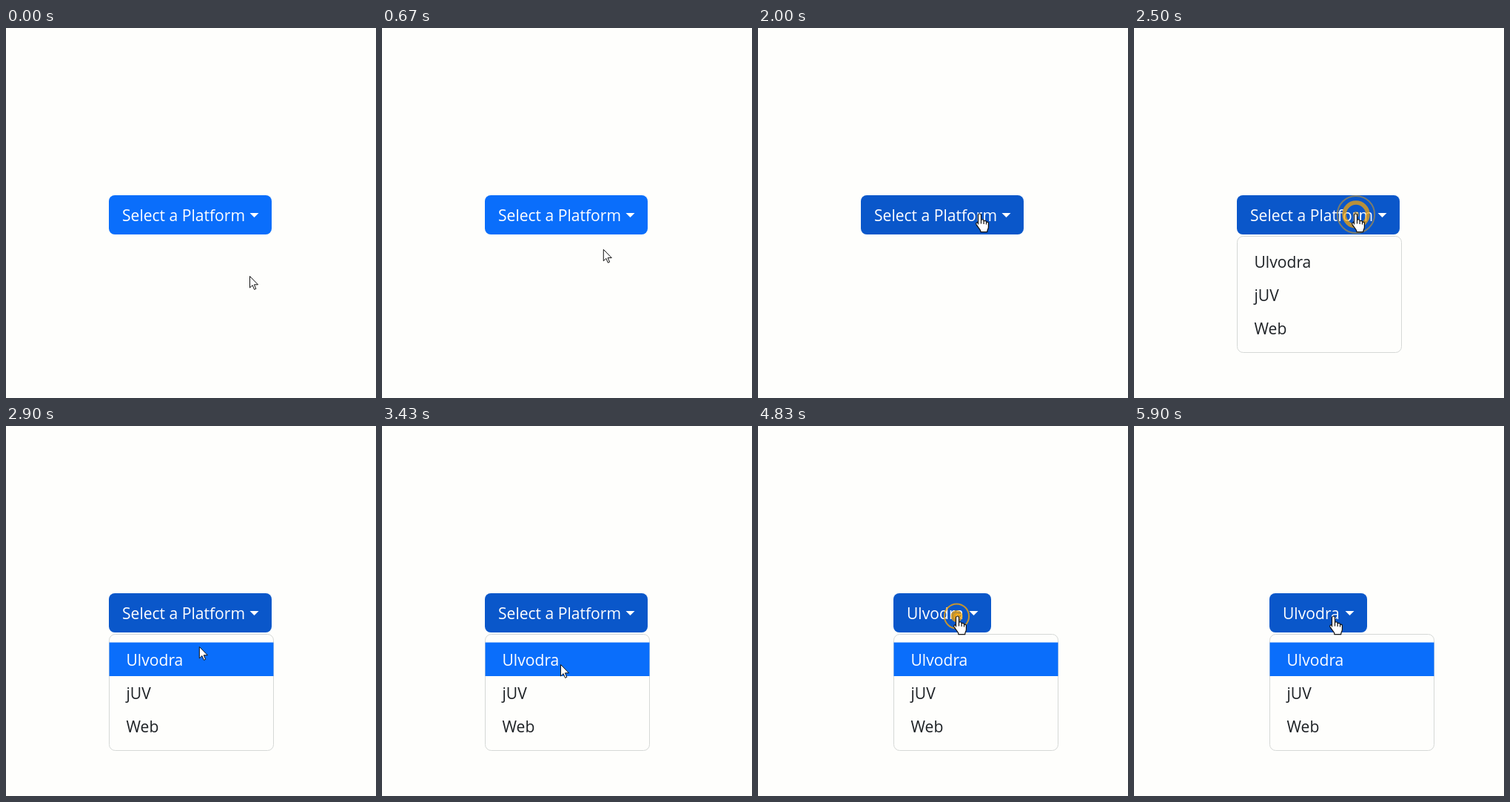
Animation of 500x500 px, one loop 5.96 s. Source, as an HTML page:

```html
<!DOCTYPE html>
<html lang="en">
<head>
<meta charset="utf-8">
<title>Dropdown demo</title>
<style>
  html, body { margin: 0; width: 100%; height: 100%; overflow: hidden; background: #fefefc; }
  svg { display: block; width: 100vw; height: 100vh; }
  text { font: 21.1px "Open Sans", "Noto Sans", sans-serif; fill: #1c2024; }
  .light { fill: #fff; }
</style>
</head>
<body>
<svg viewBox="0 0 500 500">
  <rect width="500" height="500" fill="#fefefc"/>
  <g id="button">
    <rect id="face" y="226" height="53" rx="8"/>
    <text id="label" class="light" x="18" y="261"></text>
    <path id="caret" class="light" d="M0 250h12l-6 6z"/>
  </g>
  <g id="menu">
    <rect x=".5" y="281.5" width="222" height="157" rx="8" fill="#fefefc" stroke="#d5d8d6"/>
    <rect id="highlight" x=".5" y="292.5" width="222" height="45.5" fill="#0a6efb"/>
    <text id="first" x="23.5" y="324">Ulvodra</text>
    <text x="23.5" y="369">jUV</text>
    <text x="23.5" y="414">Web</text>
  </g>
  <g id="ripple" fill="none" stroke="#ffa800">
    <circle id="outer" stroke-width="2"/>
    <circle id="ring" stroke-width="5.5"/>
    <circle id="dot" r="4" fill="#ffa800" stroke="none"/>
  </g>
  <g id="cursor" fill="#fff" stroke="#111" stroke-linejoin="round">
    <path id="arrow" d="M.5.5v15.5l3.6-3.4 2.5 5.8 2.2-1-2.4-5.6h5.1z"/>
    <path id="hand" stroke-width="1.2" d="M-2 14V2a2 2 0 0 1 4 0v7.5c0-2.5 3.6-2.3 3.6.4v.8c.3-2 3.4-1.8 3.4.6v1c.4-1.8 2.9-1.4 2.9.8v5c0 2-1.2 3-1.6 5v1.5h-9v-1.5c-1-2-3.5-5-5.6-8.2c-1.6-2.6 1-3.8 2.3-2.2zM2 9.5v4M5.6 10.5v3.5M9 11.5v3"/>
  </g>
</svg>
<script>
const LOOP = 5960;
const IDLE = [10, 110, 251], HOVER = [11, 96, 210], ACTIVE = [10, 87, 202];
const el = {};
for (const node of document.querySelectorAll('[id]')) el[node.id] = node;

const clamp = v => Math.max(0, Math.min(1, v));
const show = (node, on) => node.setAttribute('display', on ? 'inline' : 'none');
const set = (node, attrs) => {
  for (const name in attrs) node.setAttribute(name, attrs[name]);
};

// Pointer stops: time, x, y
const stops = [
  [0, 329, 335], [20, 329, 335], [600, 301, 302], [1130, 291, 281],
  [1200, 293, 272], [1270, 302, 261], [1930, 302, 261], [2000, 299.5, 251],
  [2700, 299.5, 251], [3030, 241, 322], [3830, 241, 322], [4030, 289, 254],
  [4170, 305, 248], [4400, 305, 248], [4650, 269.5, 257], [LOOP, 269.5, 257]
];

// Speed through a stop; zero where the pointer rests before or after it.
function speed(i, axis) {
  const a = stops[i - 1], b = stops[i], c = stops[i + 1];
  if (!a || !c) return 0;
  const resting = (p, q) => p[1] === q[1] && p[2] === q[2];
  return resting(a, b) || resting(b, c) ? 0 : (c[axis] - a[axis]) / (c[0] - a[0]);
}

function pointerAt(t) {
  const i = stops.findIndex(s => s[0] > t);
  const a = stops[i - 1], b = stops[i];
  const span = b[0] - a[0], u = (t - a[0]) / span, v = 1 - u;
  return [1, 2].map(axis =>
    a[axis] * v * v * (1 + 2 * u) + b[axis] * u * u * (3 - 2 * u) +
    span * u * v * (speed(i - 1, axis) * v - speed(i, axis) * u));
}

// Each click pauses part-way, then finishes at its own rate.
const clicks = [
  { start: 2200, pause: 2500, resume: 2700, rate: 1, x: 300, y: 252 },
  { start: 3430, pause: 3630, resume: 3830, rate: 1, x: 240.5, y: 323 },
  { start: 4700, pause: 4970, resume: 5430, rate: 2.3, x: 268.5, y: 257 }
];

function drawRipple(t) {
  const click = clicks.filter(c => t > c.start).pop();
  const age = click
    ? Math.min(t, click.pause) - click.start + Math.max(0, t - click.resume) * click.rate
    : 0;
  const on = age > 40 && age < 500;
  show(el.ripple, on);
  if (!on) return;
  const thin = clamp(1 - age / 550);
  set(el.ripple, { transform: `translate(${click.x} ${click.y})` });
  set(el.outer, { r: 1.45 * Math.sqrt(age), opacity: thin });
  set(el.ring, { r: Math.max(0, 0.063 * age - 3), opacity: 0.72 * (1 - (age / 520) ** 8) });
  set(el.dot, { opacity: thin });
}

function faceColor(t) {
  const fade = (from, to, start, span) => {
    const k = clamp((t - start) / span);
    return `rgb(${from.map((v, i) => Math.round(v + (to[i] - v) * k))})`;
  };
  if (t < 1930) return fade(IDLE, HOVER, 1200, 100);
  if (t < 3500) return fade(HOVER, ACTIVE, 1930, 70);
  if (t < 4640) return fade(IDLE, HOVER, 3950, 100);
  return fade(HOVER, ACTIVE, 4640, 60);
}

function draw(t) {
  const chosen = t >= 3500;
  const left = chosen ? 183 : 139;
  const width = chosen ? 132 : 220;
  const open = (t >= 2200 && t < 3500) || t >= 4700;
  const [x, y] = pointerAt(t);

  set(el.button, { transform: `translate(${left} 0)` });
  set(el.face, { width, fill: faceColor(t) });
  el.label.textContent = chosen ? 'Ulvodra' : 'Select a Platform';
  set(el.caret, { transform: `translate(${width - 29.5} 0)` });

  show(el.menu, open);
  set(el.menu, { transform: `translate(${left} 0)` });
  const lit = chosen || y >= 293;
  show(el.highlight, lit);
  el.first.classList.toggle('light', lit);

  drawRipple(t);

  const overButton = x >= left && x < left + width && y >= 226 && y < 279;
  show(el.hand, overButton);
  show(el.arrow, !overButton);
  set(el.cursor, { transform: `translate(${x} ${y})` });
}

function tick() {
  draw(performance.now() % LOOP);
  requestAnimationFrame(tick);
}
tick();
</script>
</body>
</html>
```
